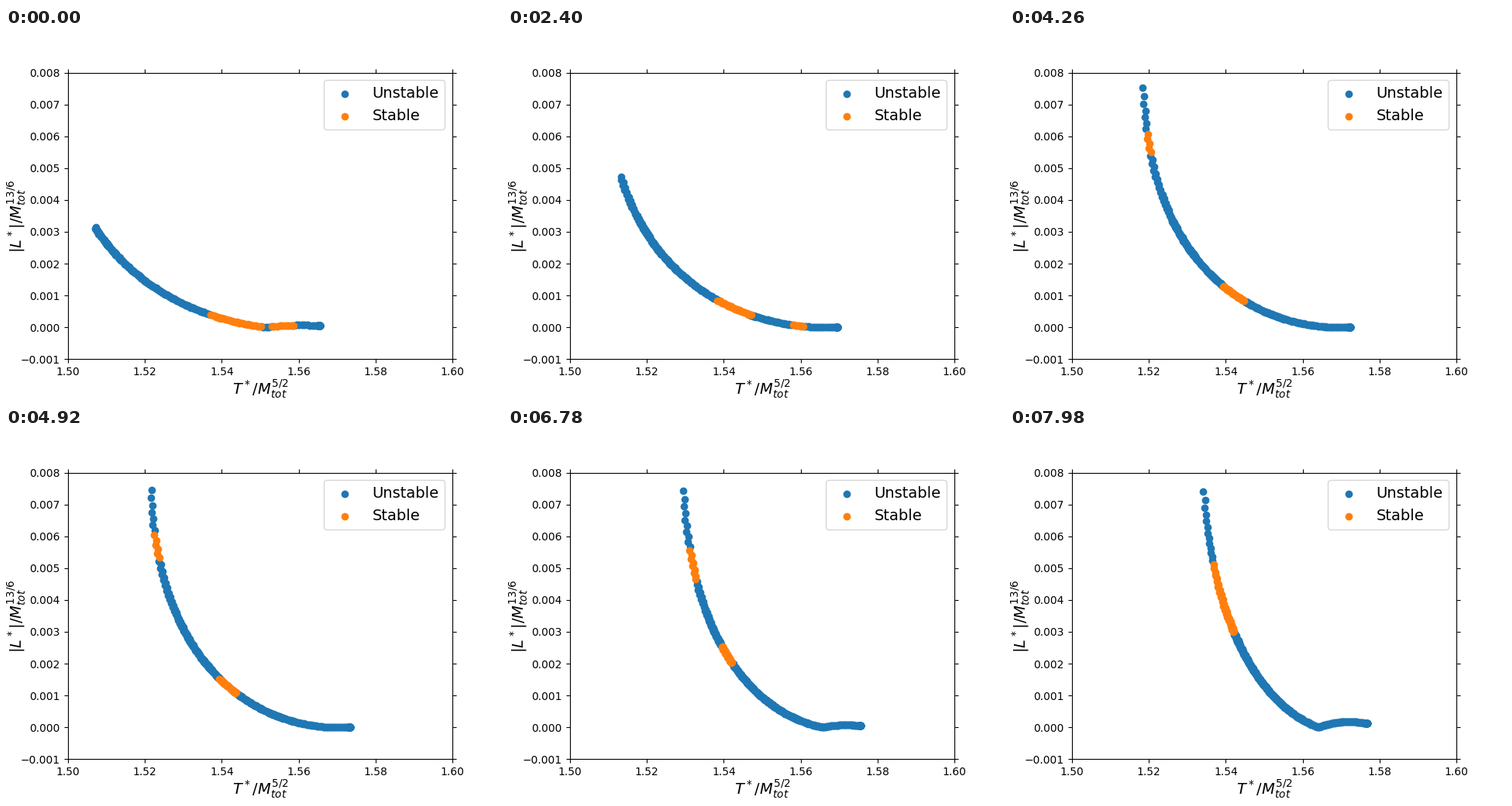
These frames come from a looping animation (640x480 px, 8000 ms). A matplotlib script:

```python
import numpy as np
import matplotlib.pyplot as plt
from matplotlib.animation import FuncAnimation

LOOP, STEP, FRAMES = 8000, 60, 134
LAST = STEP * (FRAMES - 1)

# Points have integer ranks; their gap in w widens towards the top.
GRID = np.linspace(-0.4, 3.0, 3000)
GAP = np.maximum(0.01, 0.05 * np.exp(1.5 * (GRID - 2.75)))
RANK = np.cumsum((GRID[1] - GRID[0]) / GAP)
FIRST = np.interp(1.79, GRID, RANK)
FLOW = 82           # ranks climbed during one loop
BEND = 0.54


def curve(w, p):
    """Points of the curve at parameter w and loop progress p."""
    base = 1.5607 + 0.0228 * p - 0.0115 * p ** 2
    width = 0.0641 - 0.0224 * p - 0.0036 * p ** 2
    bow = 0.001 - 0.0024 * p ** 4
    dip = 0.9 * abs(p - 0.42) ** 3

    # lower right end, from the slope at w = 0
    end = 1.5653 + 0.0149 * p - 0.0036 * p ** 2
    tail = (base - end) / (BEND * (width + 2 * bow))
    w = np.maximum(w, tail)

    x = base - width * np.sin(BEND * w) - bow * np.sin(2 * BEND * w)
    y = np.abs(w ** 2 - dip) * 1e-3
    return x, y


def is_stable(w, p):
    bands = [
        (0.30 + 1.02 * p + 0.45 * p ** 3, 0.68 + 0.78 * p + 0.53 * p ** 4),
        (0.06 + 1.30 * p ** 2, 0.22 + 0.17 * p),
        (2.36 - 0.38 * p ** 4, 2.56 - 0.24 * p ** 2),
    ]
    return np.any([(w >= low) & (w <= high) for low, high in bands], axis=0)


def points(p):
    k = np.arange(300)
    w = np.interp(FIRST + FLOW * p - k, RANK, GRID)
    x, y = curve(w, p)
    x += np.where(k % 2 == 0, 1, -1) * 0.00018     # two interleaved rows
    keep = y <= (8.05 - 0.6 * p) * 1e-3
    return np.column_stack([x, y])[keep], is_stable(w, p)[keep]


fig, ax = plt.subplots(figsize=(6.4, 4.8), dpi=100)
unstable_dots = ax.scatter([], [], color="C0", label="Unstable")
stable_dots = ax.scatter([], [], color="C1", label="Stable")
ax.set_xlim(1.50, 1.60)
ax.set_ylim(-0.001, 0.008)
ax.tick_params(top=True, right=True)
ax.tick_params(axis="y", pad=4)
ax.set_xlabel(r"$T^*/M_{tot}^{5/2}$", fontsize=14, labelpad=1)
ax.set_ylabel(r"$|L^*|/M_{tot}^{13/6}$", fontsize=14, labelpad=-7)
ax.legend(loc="upper right", fontsize=14)


def update(i):
    xy, stable = points(i * STEP / LAST)
    unstable_dots.set_offsets(xy[~stable])
    stable_dots.set_offsets(xy[stable])
    return unstable_dots, stable_dots


anim = FuncAnimation(fig, update, frames=FRAMES, interval=LOOP / FRAMES,
                     init_func=lambda: update(0), repeat=True, repeat_delay=0)
plt.show()
```
